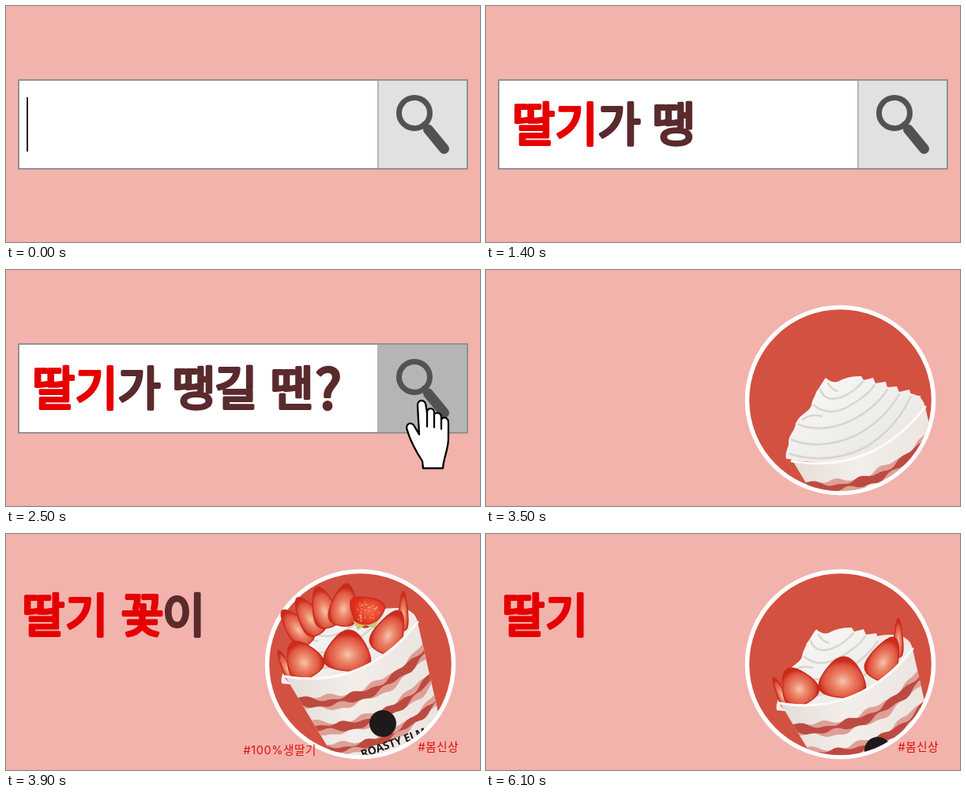
An HTML page for the animation above (6300 ms loop, 600x300 px).

```html
<!DOCTYPE html>
<html lang="ko">
<head>
<meta charset="utf-8">
<title>딸기 꽃이 피었습니다</title>
<style>
  html, body { margin: 0; width: 100%; height: 100%; overflow: hidden; background: #f2b3ad; }
  svg { display: block; width: 100vw; height: 100vh; }
  text { font-family: "Noto Sans CJK KR", "Noto Sans CJK", sans-serif; }
  .big { font-size: 59px; stroke-width: 3.8; stroke-linejoin: round; }
  .red { fill: #e60000; stroke: #e60000; }
  .dark { fill: #5a2a2c; stroke: #5a2a2c; }
  .tag { font-family: Inter, "Noto Sans CJK KR", sans-serif; font-size: 14.5px; letter-spacing: .6px; fill: #e00b0b; }
  .label { font-family: "Open Sans", sans-serif; font-weight: 700; text-anchor: middle; fill: #1d1a1a; }
</style>
</head>
<body>
<svg viewBox="0 0 600 300" preserveAspectRatio="none">
  <defs>
    <radialGradient id="flesh" cy=".6">
      <stop offset="0" stop-color="#f6c4ab"/>
      <stop offset=".4" stop-color="#ec8468"/>
      <stop offset=".8" stop-color="#df5540"/>
      <stop offset="1" stop-color="#cc2a1c"/>
    </radialGradient>
    <radialGradient id="skin" cx=".4" cy=".6">
      <stop offset="0" stop-color="#f9694a"/>
      <stop offset="1" stop-color="#dd2c18"/>
    </radialGradient>
    <linearGradient id="cream" x1="0" y1="0" x2="1" y2="1">
      <stop offset="0" stop-color="#fbfaf8"/>
      <stop offset="1" stop-color="#e6e3df"/>
    </linearGradient>
    <linearGradient id="wall">
      <stop offset="0" stop-color="#e2dad5"/>
      <stop offset=".4" stop-color="#f3eeea"/>
      <stop offset="1" stop-color="#e8e1dc"/>
    </linearGradient>
    <clipPath id="window"><path d="M300 0H600V165.5H564A115.5 115.5 0 0 1 333 165.5H300Z"/></clipPath>
    <clipPath id="cupShape"><path d="M340 160Q440 176 507 90L537 222 553 300H424Z"/></clipPath>
  </defs>
  <rect width="600" height="300" fill="#f2b3ad"/>

  <g id="search">
    <rect x="16" y="94" width="568" height="113" fill="#fff"/>
    <rect id="button" x="471" y="94" width="113" height="113"/>
    <path d="M471 94V207" stroke="#b4b4b4" stroke-width="2"/>
    <rect x="16" y="94" width="568" height="113" fill="none" stroke="#919191" stroke-width="2"/>
    <g fill="none" stroke="#525252" stroke-linecap="round">
      <circle cx="517" cy="136" r="19.5" stroke-width="7"/>
      <path d="M529 150L535 157" stroke-width="6"/>
      <path d="M534.5 157L554.5 181.5" stroke-width="13"/>
    </g>
    <rect id="caret" x="26" y="116" width="2" height="69" fill="#222"/>
    <g id="query"></g>
    <g id="hand" fill="#fff" stroke="#000" stroke-width="2.3" stroke-linejoin="round" stroke-linecap="round">
      <path d="M528 252L527 243C520 232 512 218 508 204C505 197 511 192 516 197L523 209 521 172C521 164 531 164 531.5 172L533 181C533 174 542 175 542 181V184C543 180 551 181 551 187V190C553 186 560 187 560 194V214C560 228 554 238 553 252Z"/>
      <path d="M533 181V199M542 184V200M551 190V202" fill="none"/>
    </g>
  </g>

  <g id="promo">
    <circle cx="448.5" cy="165.5" r="118" fill="#d35140" stroke="#fff" stroke-width="5.5"/>
    <g clip-path="url(#window)"><g id="cup"></g></g>
    <g id="headline"></g>
    <g id="extras" data-from="3"></g>
    <text class="tag" x="521.5" y="276" data-from="1">#봄신상</text>
    <text class="tag" x="300.5" y="279.5" data-from="2">#100%생딸기</text>
    <text class="tag" x="477.5" y="36" data-from="3">#딸기쏙쏙</text>
  </g>
</svg>
<script>
const $ = id => document.getElementById(id);
const LOOP = 6300;

let seed = 7;
const random = () => (seed = seed * 16807 % 2147483647) / 2147483647;

const glyph = (char, x, y, color, attrs = '') =>
  `<text class="big ${color}" x="${x}" y="${y}" ${attrs}>${char}</text>`;

// Typed query: one character every 200 ms from 800 ms.
$('query').innerHTML =
  [['딸', 33], ['기', 87.5], ['가', 141.5], ['땡', 210.5], ['길', 264], ['땐', 334.5]]
    .map(([char, x], i) => glyph(char, x, 172, i < 2 ? 'red' : 'dark')).join('') +
  glyph('?', 391.5, 176.5, 'dark', 'style="font-size:70px"');

// Headline characters: text, x, baseline, colour, level.
$('headline').innerHTML = [
  ['딸', 20, 125, 'red', 1], ['기', 75, 125, 'red', 1],
  ['꽃', 145.5, 125, 'red', 2], ['이', 198, 125, 'dark', 2],
  ['피', 20, 197.5, 'dark', 3], ['었', 73, 197.5, 'dark', 3], ['습', 128.5, 197.5, 'dark', 3],
  ['니', 182.5, 197.5, 'dark', 3], ['다', 235.5, 197.5, 'dark', 3]
].map(([char, x, y, color, level]) => glyph(char, x, y, color, `data-from="${level}"`)).join('');

const BERRY = 'M0-1C.5-1 1 .1 1 .5C1 .9 .5 1 0 1C-.5 1-1 .9-1 .5C-1 .1-.5-1 0-1Z';
const berry = (x, y, w, h, turn, fill = 'flesh') =>
  `<path d="${BERRY}" transform="translate(${x} ${y}) rotate(${turn}) scale(${w} ${h})"
    fill="url(#${fill})" stroke="#c92a1d" stroke-width="1.4" vector-effect="non-scaling-stroke"/>`;

const dots = (count, x, y, rx, ry, r, color) => Array.from({ length: count }, () => {
  const angle = random() * 2 * Math.PI, reach = Math.sqrt(random());
  return `<circle cx="${(x + rx * reach * Math.cos(angle)).toFixed(1)}" cy="${(y + ry * reach * Math.sin(angle)).toFixed(1)}" r="${r}" fill="${color}"/>`;
}).join('');

const wholeBerry = (x, y, w, h, turn) =>
  berry(x, y, w, h, turn, 'skin') + dots(34, x, y, w * .75, h * .75, .8, '#f9bd85');

// A wavy layer of fruit that follows the rim at a given depth.
function layer(depth, thickness, color) {
  const edge = (offset, phase) => Array.from({ length: 41 }, (_, i) => {
    const t = i / 40, s = 1 - t;
    const d = depth + offset + 2.4 * Math.sin(t * 19 + phase) + 1.5 * Math.sin(t * 43 + phase * 2);
    const x = s * s * 335 + 2 * s * t * 440 + t * t * 514 + .3 * d;
    const y = s * s * 158 + 2 * s * t * 178 + t * t * 86 + .95 * d;
    return `${x.toFixed(1)} ${y.toFixed(1)}`;
  });
  return `<path d="M${edge(0, depth).concat(edge(thickness, depth + 2).reverse()).join('L')}Z" fill="${color}"/>`;
}
const fruitLayer = (depth, thickness) =>
  layer(depth, thickness, '#dda097') + layer(depth + 3, thickness * .55, '#bd4a41');

const slices = list => list.map(args => berry(...args)).join('');

$('cup').innerHTML = `
  <path d="M338 158C350 110 497 38 507 90L430 165Z" fill="#f3e9e5"/>
  <g id="swirl">
    <path d="M331 156C329 146 335 142 334 134C335 124 342 121 343 111C348 99 360 97 363 88C364 80 367 78 369 71C373 66 376 59 381 53Q388 60 396 58Q410 50 426 51L429 56 441 53 444 60 457 58 459 65 471 64 474 71 487 68 489 75 501 76Q503 90 498 108L440 168Z" fill="url(#cream)"/>
    <g fill="none" stroke="#cfccc8" stroke-width="2.5" stroke-linecap="round" opacity=".75">
      <path d="M374 68Q380 84 400 78Q416 72 428 58M366 88Q386 104 412 88Q434 76 443 62M346 112Q376 124 412 108Q444 92 459 68M338 132Q376 146 420 126Q456 106 474 74M336 150Q384 164 430 142Q470 118 488 78M384 60Q388 68 396 70M352 106Q362 98 376 102"/>
    </g>
  </g>
  <g data-from="3">${slices([
    [363, 60, 16, 23, -32], [390, 42, 17, 24, -14], [450, 52, 16, 22, 30],
    [422, 46, 19, 23, 8], [471, 66, 18, 22, 18]])}</g>
  <g data-from="2">${slices([
    [353, 96, 15, 27, -40], [369, 82, 15, 27, -32], [388, 71, 16, 27, -18], [414, 68, 18, 27, 8]])}
    ${wholeBerry(442, 78, 22, 19, 190)}
    <path d="M425 88Q441 99 457 88L453 98 441 94 431 100Z" fill="#c5cc74"/></g>
  <g data-from="1">${slices([
    [340, 146, 6, 22, -25], [361, 137, 23, 25, -30], [489, 76, 6, 25, 0],
    [472, 102, 20, 29, 25], [419, 126, 30, 26, 5]])}</g>
  <g data-from="3" opacity=".7">${dots(90, 400, 72, 58, 44, .9, '#fff')}</g>
  <g clip-path="url(#cupShape)">
    <rect x="330" y="80" width="230" height="225" fill="url(#wall)"/>
    ${fruitLayer(25, 16)}${fruitLayer(59, 15)}${fruitLayer(88, 12)}
  </g>
  <path d="M338 159Q440 176 507 90" fill="none" stroke="#fdfbfa" stroke-width="3" stroke-linecap="round"/>
  <circle cx="463" cy="219" r="17" fill="#1d1a1a"/>
  <g transform="translate(478 248) rotate(-20)">
    <text class="label" font-size="14">ROASTY ELM</text>
    <text class="label" y="11" font-size="7.5">COFFEE &amp; BAKERY</text>
  </g>`;

const leaves = (x, y, turn) =>
  `<path transform="translate(${x} ${y}) rotate(${turn})" fill="#7fa23a"
    d="M-14 3Q-8-5 0-4Q8-5 14 3L6 1 4 7 0 2-5 7-6 1Z"/>`;

$('extras').innerHTML = `
  <path d="M136 59L146 70M158 48L163 63M186 48L181 63M208 59L197 71" stroke="#e60000" stroke-width="4.5"/>
  ${wholeBerry(239, 233, 20, 23, 190)}${leaves(240, 212, 4)}
  ${wholeBerry(274, 232, 23, 29, -118)}${leaves(293, 215, 52)}`;

// Level 0 shows the bare cream; every later level adds parts and lifts the cup.
const LIFT = [[49, 84], [33, 56], [14, 22], [0, 0]];
const levelAt = t => t < 3700 ? 0 : t < 3900 ? 1 : t < 4100 ? 2 : t < 6100 ? 3 : 1;

const show = (node, on) => { node.style.display = on ? '' : 'none'; };
const move = (node, x, y) => node.setAttribute('transform', `translate(${x} ${y})`);
const typed = [...$('query').children];
const parts = [...document.querySelectorAll('[data-from]')];

function draw(t) {
  const searching = t < 3500;
  show($('search'), searching);
  show($('promo'), !searching);
  if (searching) {
    show($('caret'), t < 800 && Math.floor(t / 200) % 2 === 0);
    typed.forEach((node, i) => show(node, t >= 800 + 200 * i));
    const left = 2 - Math.min(2, Math.floor((t - 2200) / 100));
    show($('hand'), t >= 2200);
    move($('hand'), 30 * left, 36 * left);
    $('button').setAttribute('fill', t < 2500 ? '#e1e1e1' : '#b5b5b5');
  } else {
    const level = levelAt(t);
    parts.forEach(node => show(node, level >= +node.dataset.from));
    move($('cup'), ...LIFT[level]);
    move($('swirl'), ...(level ? [4, 12] : [0, 0]));
  }
}

const start = performance.now();
function tick() {
  draw((performance.now() - start) % LOOP);
  requestAnimationFrame(tick);
}
tick();
</script>
</body>
</html>
```
